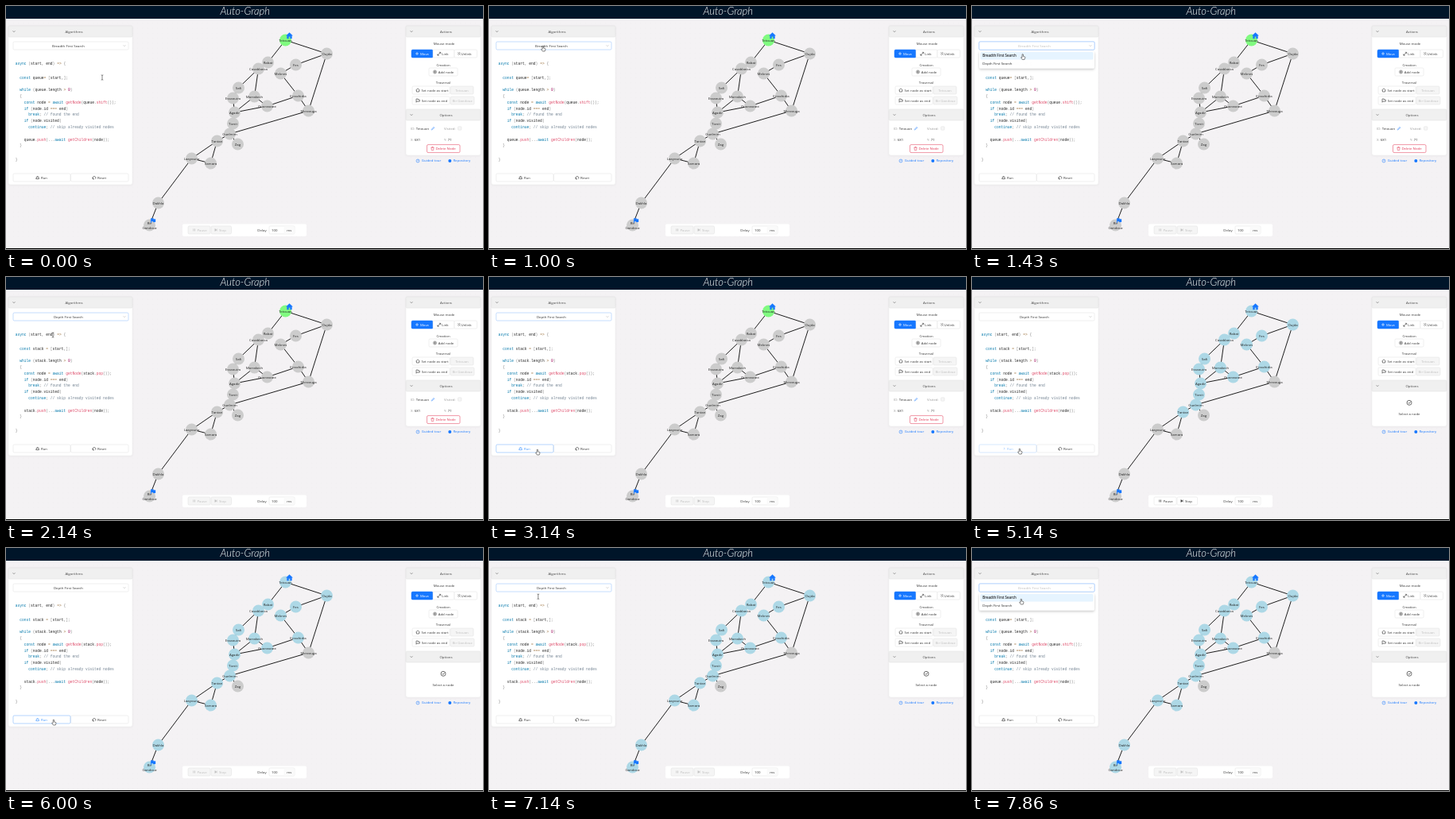
Recreate the animation shown at these times as an HTML page. Size 600 by 306 pixels, loop 8000 ms.

```html
<!DOCTYPE html>
<html lang="en">
<head>
<meta charset="utf-8">
<title>Auto-Graph</title>
<style>
html, body { margin: 0; width: 100%; height: 100%; overflow: hidden; background: #f4f2f4 }
svg { display: block; width: 600px; height: 306px }
text { font: 4.35px "Open Sans", "Noto Sans", sans-serif; white-space: pre }
.code { font: 4.6px "Liberation Mono", monospace }
.title { font: italic 300 13px Lato, sans-serif }
.bold { font-weight: 600 }
</style>
</head>
<body>
<svg id="stage" viewBox="0 0 600 306"></svg>
<script>
const stage = document.getElementById('stage');
const LOOP = 8000, STEP = 1000 / 7;
const BLUE = '#1677ff', INK = '#333', FAINT = '#bfbfbf', LINE = '#dedede', RED = '#e0314f';

// Listed in the order in which the depth-first search visits them.
const nodes = [
  ['Tetouan', 351, 43], ['Oujda', 403, 60], ['Fes', 364, 74], ['Meknes', 345, 85],
  ['Errachidia', 367, 113], ['Ouarzazate', 328, 126], ['Marrakech', 312, 114],
  ['Casablanca', 317, 79], ['Rabat', 329, 71], ['Safi', 292, 103], ['Essaouira', 285, 116],
  ['Agadir', 287, 134], ['Tiznit', 285, 148], ['Guelmim', 281, 161], ['Tantan', 265, 170],
  ['Samara', 257, 198], ['Laayoune', 233, 192], ['Dakhla', 191, 248], ['Bir Gandouz', 180, 276],
  ['Zag', 291, 174], ['Merzouga', 380, 132]
];
const VISITS = 19;
const links = '0-1 0-8 1-2 1-20 2-3 3-4 4-20 4-5 5-6 5-11 6-7 6-11 7-8 7-9 9-10 10-11 11-12 12-13 13-20 13-19 13-14 14-15 14-16 15-16 16-17 17-18'
  .split(' ').map(s => s.split('-'));

// time, x, y of the pointer
const path = [[0, 121, 90], [140, 121, 90], [1000, 68, 53], [1280, 68, 53], [1570, 60, 73],
  [2000, 60, 73], [2143, 59, 73], [3000, 61, 220], [5000, 60, 219], [6280, 60, 219],
  [7286, 62, 52], [7430, 62, 52], [7857, 62, 67], [8000, 62, 67]];

const rect = (x, y, w, h, fill = '#fff', stroke = 'none', r = 1.5, extra = '') =>
  `<rect x="${x}" y="${y}" width="${w}" height="${h}" rx="${r}" fill="${fill}" stroke="${stroke}" stroke-width=".5" ${extra}/>`;
const text = (x, y, s, fill = INK, anchor = 'middle', cls = '') =>
  `<text x="${x}" y="${y + 1.5}" fill="${fill}" text-anchor="${anchor}" class="${cls}">${s}</text>`;
const stroke = (d, color = INK, w = .6, fill = 'none') =>
  `<path d="${d}" stroke="${color}" stroke-width="${w}" fill="${fill}"/>`;
const circle = (x, y, r, fill, line = 'none', w = .5) =>
  `<circle cx="${x}" cy="${y}" r="${r}" fill="${fill}" stroke="${line}" stroke-width="${w}"/>`;
const button = (x, y, w, label, textX, fill = '#fff', line = LINE, ink = INK) =>
  rect(x, y, w, 10, fill, line) + text(textX, y + 5, label, ink);
const chevron = (x, y, color = '#666') => stroke(`M${x - 1.5} ${y - .8}l1.5 1.6l1.5-1.6`, color);
const panel = (x, y, w, h) => rect(x, y, w, h, '#fff', '#e8e8e8', 2, 'filter="url(#shade)"');
const heading = (x, y, w, label, textX) =>
  rect(x, y, w, 14, '#f0f0f0', LINE, 1.5) + chevron(x + 7, y + 7) + text(textX, y + 7.3, label, '#444');

function codeLines(depth) {
  const name = depth ? 'stack' : 'queue';
  return `async (start, end) => {

  const ${name}${depth ? ' ' : ''}= [start,];

  while (${name}.length > 0)
  {
    const node = await getNode(${name}.${depth ? 'pop' : 'shift'}());
    if (node.id === end)
      break; // found the end
    if (node.visited)
      continue; // skip already visited nodes

    ${name}.push(...await getChildren(node));
  }

}`.split('\n');
}

const token = /(\/\/.*)|\b(async|const|while|await|if|break|continue)\b|(\w+)(?=\()|\b(0)\b|([{}()[\];,.]+)|([=>]+)/g;
const tokenColors = ['#708090', '#0077aa', '#dd4a68', '#990055', '#888', '#9a6e3a'];
const paint = line => line.replace(token, (s, ...groups) =>
  `<tspan fill="${tokenColors[groups.slice(0, 6).findIndex(g => g)]}">${s}</tspan>`);

// The function body has a small margin above and below.
const codeY = (i, count) => 74.4 + 7.8 * i + (i === 0 ? -2 : i === count - 1 ? 2 : 0);

function pointer(t) {
  const i = path.findIndex((p, k) => k && t <= p[0]);
  const [a, b] = [path[i - 1], path[i]];
  const k = (t - a[0]) / (b[0] - a[0]), e = k * k * (3 - 2 * k);
  return [a[1] + (b[1] - a[1]) * e, a[2] + (b[2] - a[2]) * e];
}

function cursor(x, y, open) {
  const beam = y > 60 && y < 208 && !open;
  const shape = beam
    ? stroke('M-1.3-3.2Q0-3.2 0-2.4V2.4Q0 3.2-1.3 3.2M1.3-3.2Q0-3.2 0-2.4M0 2.4Q0 3.2 1.3 3.2')
    : stroke('M-.8-2.5Q0-3.2.6-2.4V0L2.7.6Q3.2.9 2.9 2L2.2 4H-.6L-2.3 1.5Q-2.2.6-.8 1.3Z', '#222', .55, '#fff');
  return `<g transform="translate(${x} ${y})">${shape}</g>`;
}

function graph(t, visited, running) {
  const beat = (t - 3500) / 106 % 1;
  const edges = links.map(([a, b]) =>
    stroke(`M${nodes[a].slice(1)}L${nodes[b].slice(1)}`, '#111', .95)).join('');
  const discs = nodes.map(([name, x, y], i) => {
    const fill = i < visited ? '#add8e6' : i ? '#ccc' : '#80fa80';
    const ring = running && i === visited - 1 && beat < .4;
    const words = i === 18 ? name.split(' ') : [name];
    return circle(x, y, 7.5, fill, ring ? '#222' : 'none', .8) +
      words.map((w, k) => text(x, y + (words.length > 1 ? k * 6 - 3 : 0), w, '#222')).join('');
  }).join('');
  const home = stroke('M352 37.2L356 33.5L360 37.2H359V41H357V38.5H355V41H353V37.2Z', BLUE, .3, BLUE);
  const flag = stroke('M181.7 273V267.5H185V268.5H187.5V272H184.5V271H182.3V273Z', BLUE, .3, BLUE);
  return `<g transform="translate(.5 0)">${edges + discs + home + flag}</g>`;
}

function algorithms(t, depth, open, running) {
  const active = (t > 850 && t < 3850) || t > 7100;
  const hover = t > 2950 && t < 6400;
  const name = depth ? 'Depth First Search' : 'Breadth First Search';
  const lines = codeLines(depth);
  let s = panel(3, 25, 156, 200) + heading(3, 25, 156, 'Algorithms', 85.5);
  if (open) s += rect(8.2, 44.2, 146.6, 11.6, '#d6e8ff', 'none', 2);
  s += rect(9, 45, 145, 10, '#fff', active ? '#8ab8f8' : LINE);
  s += text(78.5, 50, name, open ? FAINT : INK) + chevron(149, 50, FAINT);
  s += lines.map((line, i) =>
    text(11.7, codeY(i, lines.length), paint(line), '#222', 'start', 'code')).join('');
  s += button(81.5, 211, 72.5, 'Reset', 120.5);
  s += stroke('M109.5 217.7A1.9 1.9 0 1 1 112.3 217.7M109.2 216V218H111');
  s += `<g opacity="${running ? .55 : 1}">` +
    button(9, 211, 72, 'Run', 48, '#fff', hover ? '#69a8f8' : LINE, hover ? '#4096ff' : INK);
  const ink = hover ? '#4096ff' : INK;
  s += running
    ? `<g transform="rotate(${t * .36} 39 216)">${stroke('M39 214.2A1.8 1.8 0 0 1 40.8 216', ink)}</g>`
    : stroke('M38.3 217.8V215.5Q39.7 212.5 41 215.5V217.8ZM37.4 217.8L38.3 216.5M42 217.8L41 216.5M39.7 215.2V216', ink);
  s += '</g>';
  if (open) {
    const fade = Math.min(1, (t - (t > 7000 ? 7140 : 1140)) / 290);
    const row = (y, label, on) => (on ? rect(10.5, y - 4.7, 142, 9.4, '#e6f4ff') : '') +
      text(13.3, y, label, '#222', 'start', on ? 'bold' : '');
    s += `<g opacity="${fade}">` + rect(9, 57, 145, 21.5, '#fff', 'none', 2, 'filter="url(#drop)"') +
      row(62.8, 'Breadth First Search', !depth) + row(72.4, 'Depth First Search', depth) + '</g>';
  }
  return s;
}

function actions(selected) {
  let s = panel(503, 25, 94, 163) + heading(503, 25, 94, 'Actions', 553.5);
  s += text(551, 47, 'Mouse mode') + text(550, 74.5, 'Creation') + text(550, 96.7, 'Traversal');
  s += button(510, 55, 27, 'Move', 526.5, BLUE, BLUE, '#fff') + button(537, 55, 27, 'Link', 552.5) + button(564, 55, 28.5, 'Unlink', 579);
  s += stroke('M515 60H519M517 58V62', '#fff') + stroke('M543 62L546.5 58.5M544.8 58.3H546.7V60.2M542.8 60.3V62.2H544.7') +
    stroke('M568.5 58.5L571.5 61.5M568.3 60.5L569.5 61.8M570.2 58.2L571.5 59.4');
  s += button(532, 78, 36, 'Add node', 553.5) + circle(539.5, 83, 2, 'none', INK) + stroke('M538.3 83H540.7M539.5 81.8V84.2');
  s += button(511, 101, 47, 'Set node as start', 539.5) + button(559, 101, 29, 'Tetouan', 573.5, '#f5f5f5', LINE, FAINT);
  s += button(511, 114, 47, 'Set node as end', 539) + button(559, 114, 30, 'Bir Gandouz', 574, '#f5f5f5', LINE, FAINT);
  s += stroke('M515.5 106L518 103.8L520.5 106M516.4 105.7V108H519.6V105.7') + stroke('M516 121.5V117H518.3V118H520.3V120.2H516');
  s += heading(503, 130, 94, 'Options', 553.5);
  if (selected) {
    const pair = (x, y, key, value) => text(x, y, `<tspan fill="#999">${key}:</tspan> ${value}`, INK, 'start');
    s += pair(509, 154, 'ID', 'Tetouan') + pair(551, 154, 'Visited', '') + pair(509, 168.3, 'X', '681') + pair(551, 168.3, 'Y', '71');
    s += stroke('M535 155.6L538 152.4L538.8 153.2L535.8 156Z', BLUE, .5) + rect(568.5, 151.8, 4.4, 4.4, '#f5f5f5', LINE, .8);
    s += button(529.5, 174.6, 41.5, 'Delete Node', 553, '#fff', RED, RED) +
      stroke('M534.5 178.4H538.5M535 178.6L535.3 181.6H537.7L538 178.6M535.8 178.1V177.4H537.2V178.1', RED, .5);
  } else {
    s += circle(550, 158.3, 3, 'none', INK, .7) + stroke('M548.5 158.2L549.7 159.4L551.6 157.2', INK, .7) + text(550, 172, 'Select a node');
  }
  s += circle(518, 195, 2, 'none', BLUE) + stroke('M517.3 194.4Q518 193.3 518.6 194.3Q518.6 194.8 518 195.3M518 196V196.4', BLUE, .4) +
    text(535, 194.8, 'Guided tour', BLUE);
  return s + circle(558.3, 195, 2, BLUE) + text(573.3, 194.8, 'Repository', BLUE);
}

function controls(running) {
  const ink = running ? INK : FAINT, fill = running ? '#fff' : '#f5f5f5';
  return rect(222, 274.5, 156, 15.5, '#fff', 'none', 2) +
    button(229, 277, 28, 'Pause', 246.5, fill, LINE, ink) + button(258, 277, 25.5, 'Step', 272.5, fill, LINE, ink) +
    stroke('M235.7 280.5V283.5M237.5 280.5V283.5', ink, .7) + stroke('M262.8 280.4L265 282L262.8 283.6ZM265.5 280.4V283.6', ink, .4, ink) +
    text(322, 282, 'Delay') + rect(331, 277, 32, 10, '#fff', LINE) + rect(349.5, 277.2, 13.3, 9.6, '#fafafa', 'none') +
    text(334, 282, '100', INK, 'start') + text(356.3, 282, 'ms');
}

const defs = `<defs>
  <pattern id="dots" width="6.25" height="6.25" patternUnits="userSpaceOnUse"><circle cx="3" cy="3" r=".4" fill="#e6e4e6"/></pattern>
  <filter id="shade"><feDropShadow dx="0" dy=".4" stdDeviation=".8" flood-opacity=".06"/></filter>
  <filter id="drop" y="-20%" height="150%"><feDropShadow dx="0" dy="1.5" stdDeviation="1.8" flood-opacity=".22"/></filter>
</defs>`;

function draw(t) {
  const started = t > 3850, running = started && t < 5700;
  const visited = started ? Math.min(VISITS, Math.floor((t - 3500) / 106)) : 0;
  const depth = t > 1990 && t < 7850;
  const open = (t > 1280 && t < 1990) || t > 7280;
  stage.innerHTML = defs + rect(0, 0, 600, 306, '#f4f2f4', 'none', 0) + rect(0, 16, 600, 289, 'url(#dots)', 'none', 0) +
    rect(0, 0, 600, 16, '#001529', 'none', 0) + text(300.7, 9.7, 'Auto-Graph', '#fff', 'middle', 'title') +
    graph(t, visited, running) + algorithms(t, depth, open, running) + actions(!started) + controls(running) +
    rect(0, 305, 600, 1, '#000', 'none', 0) + cursor(...pointer(t), open);
}

const begin = performance.now();
let last = -1;
function tick() {
  const t = (performance.now() - begin) % LOOP;
  const step = Math.floor((t + 6) / STEP);
  if (step !== last) draw(Math.min(LOOP, step * STEP));
  last = step;
  requestAnimationFrame(tick);
}
tick();
</script>
</body>
</html>
```
